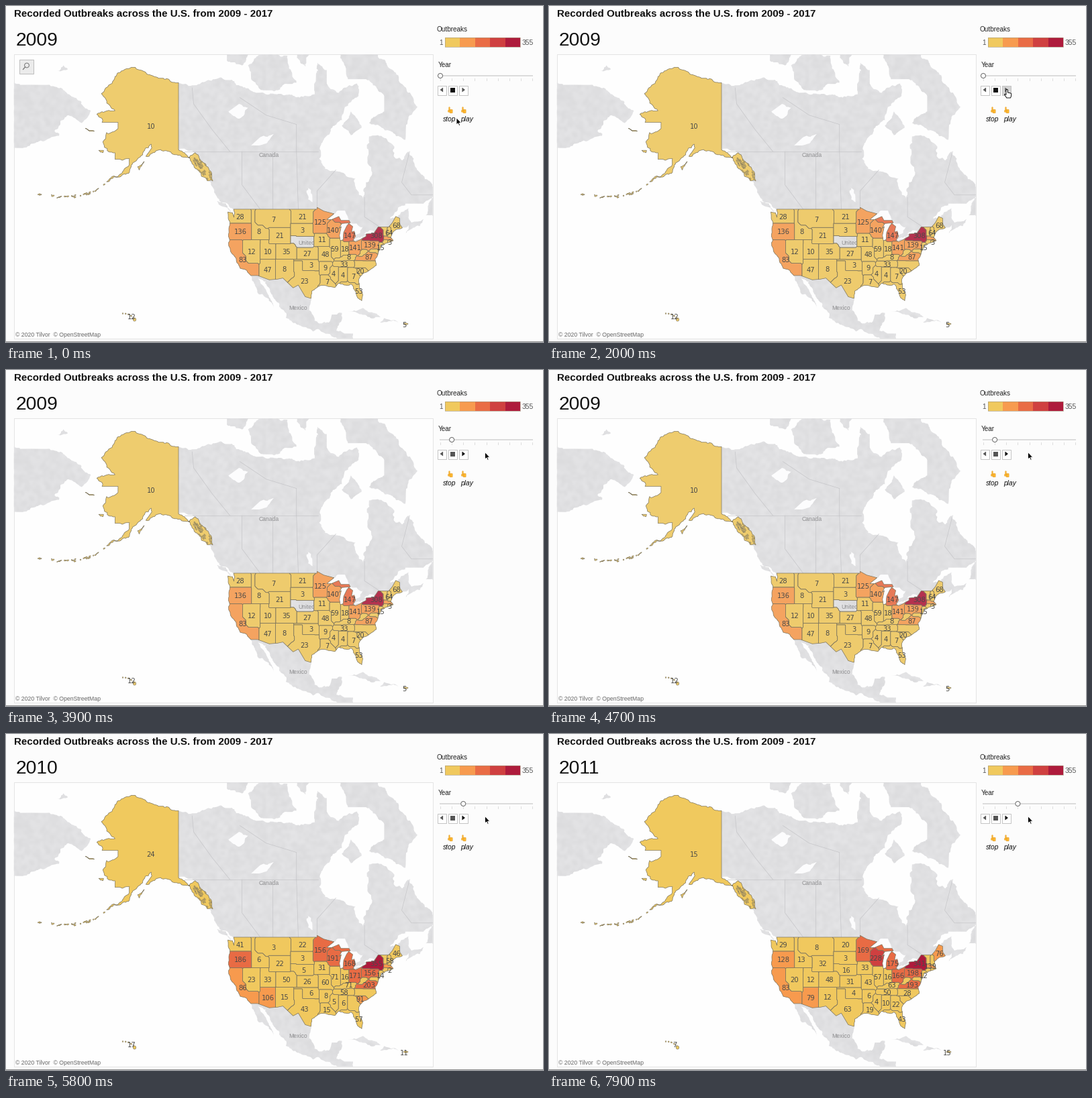
Animation of 800x501 px, one loop 8000 ms. Source, as a matplotlib script:

```python
import numpy as np
import matplotlib.pyplot as plt
from matplotlib.animation import FuncAnimation
from matplotlib.colors import to_rgba_array
from matplotlib.patches import Circle, Ellipse, FancyBboxPatch, PathPatch, Polygon, Rectangle
from matplotlib.path import Path

W, H, DPI = 800, 501, 100
STEP, FRAMES = 100, 80
PT = 72 / DPI
INK, LINE = "#4a4a48", "#7d755e"
SCALE = ["#f0c95e", "#f79b4f", "#e96c45", "#cf4040", "#ae1b3c"]
rng = np.random.default_rng(9)

fig = plt.figure(figsize=(W / DPI, H / DPI), dpi=DPI, facecolor="#fcfcfc")
ax = fig.add_axes([0, 0, 1, 1])
ax.axis("off")


def put(patch, z):
    patch.set_zorder(z)
    return ax.add_patch(patch)


def label(x, y, s, size, color=INK, z=8, **kw):
    kw = {"family": "Liberation Sans", "va": "baseline", **kw}
    return ax.text(x, y, s, fontsize=size * PT, color=color, zorder=z, **kw)


def project(flat):
    """Web Mercator; flat holds west longitude, latitude pairs."""
    p = np.reshape(flat, (-1, 2)).astype(float)
    m = np.log(np.tan(np.pi / 4 + np.radians(p[:, 1]) / 2))
    return np.column_stack([257 + (141 - p[:, 0]) * 4.506, 303 + (0.9838 - m) * 258])


def coast(*flat, amp=0.12):
    """Roughen a coarse line by midpoint displacement; straight borders stay."""
    def split(a, b):
        d = b - a
        size = np.hypot(*d)
        if size < 3 or abs(d).min() < 0.3:
            return [a]
        shift = np.clip(rng.normal(0, amp * size), -2, 2)
        mid = (a + b) / 2 + np.array([-d[1], d[0]]) / size * shift
        return split(a, mid) + split(mid, b)
    p = project(flat)
    return np.array(sum((split(a, b) for a, b in zip(p, p[1:])), []) + [p[-1]])


def outline(*polys):
    return Path.make_compound_path(*[Path(np.vstack([p, p[:1]]), closed=True) for p in polys])


# ---- coastlines ----
us_west = coast(117.1, 32.5, 118.4, 33.9, 120.6, 34.5, 121.9, 36.6, 122.5, 37.7, 123.8, 39,
                124.4, 40.4, 124.1, 42, 124.5, 42.8, 124, 46.2, 124.7, 48.4, 123.1, 48.2,
                122.7, 47.2, 122.4, 48.2, 122.8, 49, amp=0.06)
us_east = coast(67, 44.8, 70.5, 43.5, 70.8, 42.4, 70, 41.7, 74, 40.6, 75, 38.6, 76, 37,
                75.6, 35.3, 78, 33.9, 81.2, 31.8, 81.4, 30.6, 80.1, 27, 80.4, 25.2, 81.8, 26.1,
                82.8, 28.4, 84, 30.1, 85.3, 29.7, 88, 30.4, 89.3, 29.1, 91.5, 29.4, 94, 29.7,
                97, 28, 97.2, 25.9, amp=0.06)
us_north = project([95.2, 49, 95.2, 49.4, 93, 48.6, 89.6, 48, 92, 46.7, 90.4, 46.7, 88, 47.4, 87.3, 46.5,
                    84.6, 46.5, 84.2, 45.95, 87, 45.8, 88, 44.6, 87.2, 45.1, 87.8, 43, 87.5, 41.7,
                    86.6, 41.9, 86.4, 43.7, 85.4, 45.2, 84.7, 45.8, 83.4, 45.1, 83.8, 43.8, 82.9, 44,
                    82.5, 42.8, 83.3, 41.8, 82.5, 41.4, 81, 41.9, 78.9, 42.8, 79, 43.3, 76.4, 43.5,
                    75, 45, 71.5, 45, 70.3, 46, 69.2, 47.4, 67.9, 47, 67.8, 45.6])
us_south = project([99.1, 26.4, 101.4, 29.8, 103.1, 29, 106.5, 31.8, 108.2, 31.5, 111, 31.3, 114.8, 32.5])
lower48 = np.vstack([us_west, us_north, us_east, us_south])

arctic = coast(141, 60.3, 141, 69.6, 135, 69.3, 127, 70.2, 115, 68.4, 101, 67.8, 96, 68.2, 95, 71.8,
               92, 71, 92, 69.5, 88, 68.4, 82, 69.5, 81.5, 68, 86, 66.6, 87, 64.8, 94, 61, 94.5, 58.8,
               92.5, 57, 88, 56.5, 82.5, 55.2, 82, 53, 80, 51.3, 79, 54.5, 77, 56, 78.5, 58.5, 78, 62.4,
               73.5, 62.3, 70, 61, 69.5, 59, 67, 58.5, 65, 60, 61.5, 56.5, 57, 54, 55.7, 52.5, 60, 50.2,
               66, 50.2, 71, 46.9, 65, 49.2, 64, 46, 60, 46.8, 61.2, 45.2, 65.8, 43.5, 64.8, 45.5, 67, 44.8)
mexico = coast(97.2, 25.9, 97.8, 22.3, 96, 19.1, 94.5, 18.2, 91, 18.8, 90.3, 21, 87, 21.5, 88.8, 15.9,
               83.3, 15, 83.7, 11, 88, 12.8, 94.3, 16.2, 96.5, 15.7, 102, 18, 105.5, 20, 105.4, 21.5,
               109.4, 25.8, 113.1, 31.2, 114.8, 31.7, 109.5, 23.1, 112.2, 26.2, 114.8, 27.5, 117.1, 32.5)
north_pacific = coast(122.8, 49, 127.5, 51, 130.3, 54.5, 135.5, 59.8, 141, 60.3)

land = [np.vstack([arctic, us_east, mexico, us_west, north_pacific])]
land += [coast(*p) for p in [
    (125, 72, 120, 71.5, 117, 73, 118, 74, 124, 74, 125, 72),
    (117, 70, 113, 68.7, 102, 69.6, 105, 72.5, 114, 72.8, 118, 71.5, 117, 70),
    (102, 72.7, 99, 71.4, 97, 74, 101, 74, 102, 72.7),
    (90, 74, 85, 70, 79, 70, 73, 68, 73, 66, 78, 64.4, 66, 61.9, 65, 65, 62, 66.6, 72, 71.5, 80, 73.7, 90, 74),
    (87, 64, 84, 62.6, 80.5, 63.7, 84, 66, 87, 64),
    (59.3, 47.7, 57, 51.4, 55.5, 51.4, 53, 47, 59.3, 47.7),
    (128.3, 50.7, 125.3, 50.2, 123.5, 48.4, 128.3, 50.7),
    (84.9, 21.9, 80, 23, 74.2, 20.2, 77.5, 19.9, 84.9, 21.9),
    (74.4, 18.5, 73, 19.9, 68.4, 18.6, 74.4, 18.5),
    (200, 70, 180, 69, 170, 66.1, 173, 64.4, 177.5, 65.5, 182, 63.2, 180.5, 62.5, 200, 59.8),
    (181, 70.9, 179, 71.5, 177.6, 71.1, 181, 70.9)]]

frame = put(Rectangle((11.5, 71.5), 624, 424, fc="#fefefe", ec="#e4e4e4", lw=PT), 0)
shape = outline(*land)
put(PathPatch(shape, fc="#e5e5e7", ec="none"), 1).set_clip_path(frame)
relief = ax.imshow(rng.random((106, 156)), cmap="gray", alpha=0.05, extent=(11, 635, 495, 72),
                   interpolation="bicubic", aspect="auto", zorder=2)
relief.set_clip_path(shape, ax.transData)

for lake in [(92, 46.7, 88.4, 48.7, 86, 48.7, 84.6, 46.5, 87.3, 46.5),
             (88, 44.6, 87.5, 41.7, 86.3, 42, 85, 45.9, 87, 45.8),
             (84.5, 46, 80, 45, 81.7, 43.3, 82.4, 43, 84, 44),
             (83.2, 41.6, 79, 42.8, 80.5, 42.7, 82.5, 42.2),
             (79.6, 43.3, 76.3, 43.5, 76.5, 44.1, 79, 43.8),
             (124.5, 66, 121, 65, 118, 66.5, 121, 67),
             (117, 61, 112, 61.3, 109.5, 62.8, 114, 62.3),
             (98.5, 53.6, 98, 51.5, 96.7, 50.5, 97.2, 53)]:
    put(Polygon(coast(*lake), fc="#fcfcfd", ec="none"), 3)

for border in [(139, 60, 94.8, 60), (136.5, 69, 136, 67, 130, 63.5, 124, 60),
               (120, 60, 120, 54, 114, 49), (110, 60, 110, 49), (102, 60, 101.4, 49),
               (102, 60, 102, 64.2, 112, 65.5, 120.7, 67.8), (89, 56.8, 95.2, 52.8, 95.2, 49),
               (79.5, 51.5, 79.5, 47.3, 74.5, 45), (64.6, 60, 67.2, 54.5, 64, 52, 57, 52)]:
    ax.plot(*project(border).T, color="#c6c6c9", lw=0.7 * PT, zorder=3)

for x, y, s in [(392, 225, "Canada"), (448, 356, "United"), (435, 453, "Mexico")]:
    label(x, y, s, 8.7, "#8e8e90", 4, ha="center")

# ---- states: every point belongs to the nearest box, cut by the coast ----
GX, GY = np.meshgrid(np.arange(326, 596, 0.5), np.arange(299, 447, 0.5))
dist, counts, tags = [], [], []


def count_label(x, y):
    tags.append(label(x, y, "", 10, family="DejaVu Sans", ha="center", va="center_baseline"))


def box_distance(x, y, w, h):
    qx, qy = abs(GX - x) - w, abs(GY - y) - h
    return np.hypot(np.maximum(qx, 0), np.maximum(qy, 0)) + np.minimum(np.maximum(qx, qy), 0)


def state(x, y, w, h, *yearly, more=()):
    """Box centre (also the label) and half sizes; yearly counts: 0 none, < 0 unlabelled."""
    dist.append(np.min([box_distance(*b) for b in [(x, y, w, h), *more]], axis=0))
    counts.append(yearly)
    count_label(x, y)


state(349, 314, 16, 9.5, 28, 41, 29)
state(349, 336.5, 16, 12.2, 136, 186, 128)
state(376, 336, 9.5, 12.3, 8, 6, 13, more=[(367.5, 314, 2, 10), (386, 341, 6, 7.5)])
state(398, 318, 25.8, 12, 7, 3, 8)
state(408, 342.5, 15.8, 12, 21, 22, 32)
state(442, 314, 17, 10, 21, 22, 20)
state(441, 333.5, 17, 9.2, 3, 3, 3)
state(443, 352, 14, 8, 0, 5, 16, more=[(428, 348, 4, 5.5)])
state(449, 369, 16.3, 8.8, 27, 26, 31)
state(418, 366, 15.5, 11.8, 35, 50, 48)
state(390, 366, 11.2, 11.7, 10, 33, 12, more=[(385, 354, 6, 5.3)])
state(366, 366, 12.6, 17.3, 12, 23, 20)
state(353, 378, 8, 9, 83, 86, 83, more=[(341, 361, 10.5, 12.3), (364, 393, 11, 9)])
state(390, 393, 11.2, 15.3, 47, 106, 79)
state(415, 392.5, 13.5, 15, 8, 15, 12)
state(445, 410, 14, 15, 23, 43, 63, more=[(435, 388, 6, 8), (432, 410, 8, 6), (460, 404, 6, 8)])
state(454, 386, 11.5, 7.8, 3, 6, 4, more=[(436, 378.8, 7, 1)])
state(476, 390.5, 8.5, 9.2, 9, 8, 6)
state(478, 411, 8, 9, 7, 15, 19)
state(476, 370, 11, 10.5, 48, 60, 43)
state(471, 348.5, 10.5, 9, 11, 31, 33)
state(468, 322, 11.5, 16.5, 125, 156, 169)
state(487, 334, 9.5, 10.8, 140, 191, 228)
state(490, 362, 7.5, 14.5, 59, 71, 57)
state(505, 362, 6, 11, 18, 16, 16)
state(520, 360, 9.3, 10.5, 141, 171, 166)
state(512, 342, 9, 10, 147, 168, 175, more=[(501, 320, 10, 2)])
state(511, 374, 10, 4, 8, 71, 63, more=[(496, 377, 6, 2)])
state(504, 385, 15.5, 3.7, 33, 58, 50)
state(488, 399, 7, 10.5, 4, 5, 4)
state(502, 401, 6.6, 11.5, 4, 6, 10)
state(517, 403, 8, 12, 7, -1, 22)
state(526, 425, 5, 10, 53, 57, 43, more=[(510, 413, 12, 3)])
state(528, 395, 7, 4.5, 20, 91, -1)
state(534, 385.5, 15, 4.5, -1, -1, 28)
state(541, 374, 9, 4.8, 87, 203, 193, more=[(528, 376.5, 8, 2)])
state(531, 368, 5, 4, -1, -1, -1)
state(549, 364.5, 5, 2, -1, -1, -1)
state(542, 356, 12.3, 5.8, 139, 156, 198)
state(558, 360.5, 2.3, 6, 15, 14, 12)
state(552, 342, 10, 8, 308, 355, 341, more=[(540, 345.5, 8, 4)])
state(564.5, 335, 2.6, 7, -1, -1, -1)
state(571, 338.5, 2.3, 7, 64, 58, -1)
state(582, 327, 8, 11, 68, 46, 76)
state(568, 346, 5, 2, -80, -100, 139)
state(565, 350.5, 3, 1.8, -1, -1, -1)
state(571, 352, 1.5, 2, 3, 2, -1)

dist = np.array(dist)
owner = dist.argmin(0)
first, second = np.partition(dist, 1, axis=0)[:2]
cut = outline(lower48)
fill = ax.imshow(np.zeros((*GX.shape, 4)), extent=(325.75, 595.75, 446.75, 298.75),
                 aspect="auto", zorder=5)
fill.set_clip_path(cut, ax.transData)
for k, d in enumerate(dist):
    rest = np.where(owner == k, second, first)
    edge = ax.contour(GX, GY, d - rest, levels=[0], colors=LINE, linewidths=0.65 * PT, zorder=6)
    edge.set_clip_path(cut, ax.transData)
put(PathPatch(cut, fc="none", ec=LINE, lw=0.7 * PT), 6)

# ---- detached areas ----
alaska = [coast(141, 69.6, 141, 60.3, 137.5, 58.9, 135.5, 59.8, 134, 58.5, 130, 56, 130, 55, 131.5, 54.8,
                134.7, 56.8, 138, 59, 144, 60, 148, 60.2, 151.8, 59.2, 150, 61.2, 154, 59, 158.5, 56,
                164.8, 54.6, 160, 56.1, 157.4, 57.6, 157.2, 58.8, 162, 58.7, 162, 59.8, 164.2, 60,
                166, 61.6, 164.8, 63, 161, 63.6, 161, 64.5, 166.3, 64.5, 168, 65.6, 162, 66.1,
                163.7, 66.8, 166.5, 68.3, 163, 69.5, 162, 70.3, 156.6, 71.3, 152, 70.8, 146, 70.1, 141, 69.6)]
alaska += [coast(154.5, 57.4, 152.3, 58.3, 154, 56.8, 154.5, 57.4),
           coast(171.8, 63.6, 168.8, 63.2, 170.5, 63.2, 171.8, 63.6),
           coast(167.4, 60.2, 165.8, 60.2, 166, 59.8, 167.4, 60.2)]
put(PathPatch(outline(*alaska), fc="none", ec=LINE, lw=0.7 * PT), 5)
spots = []


def islet(x, y, w, h, angle):
    spots.append(put(Ellipse((x, y), w, h, angle=angle, ec=LINE, lw=0.6 * PT), 5))


for f in np.sort(rng.random(26)):
    x = 47 + 100 * f
    islet(x, 284.5 - 20 * (f - 0.4) ** 2 * (1 + 1.6 * f) + rng.normal(0, 0.8),
          rng.uniform(1, 4.5), rng.uniform(0.8, 1.8), -15 - 20 * f)
for f in rng.random(22):
    islet(280 + 25 * f + rng.normal(0, 2.5), 226 + 31 * f + rng.normal(0, 3), rng.uniform(3, 8), 1.5, 55)
for k in range(5):
    islet(174 + 4.2 * k, 458.5 + 0.45 * k * k / 2 * (1 + k / 4), 1.6 + k * 0.3, 1.6, 30)
islet(191.5, 467.5, 4.5, 5, 0)
islet(595.5, 474, 7, 2.2, 0)
mainland = put(PathPatch(outline(alaska[0]), ec="none"), 4.9)
isles = put(PathPatch(outline(*alaska[1:]), ec="none"), 4.9)
for place, yearly in [((216, 179), (10, 24, 15)), ((187, 463), (12, 17, 7)), ((593, 475), (5, 11, 15))]:
    count_label(*place)
    counts.append(yearly)
counts = np.array(counts)

# ---- headings, legend and controls ----
label(12, 16, "Recorded Outbreaks across the U.S. from 2009 - 2017", 15.1, "#111111", weight="bold")
year = label(15, 59, "", 28.3, "#111111")
label(14, 493, "© 2020 Tilvor  © OpenStreetMap", 8.8, "#666666")
put(Rectangle((0, 499.5), W, 2, fc="#8f8f8f", ec="none"), 8)

search = [put(Rectangle((19.5, 79.5), 21, 21, fc="#ebebeb", ec="#bdbdbd", lw=PT), 8),
          put(Circle((31, 88.5), 3.4, fc="none", ec="#777777", lw=PT), 9),
          *ax.plot([28.5, 25.5], [91, 94.5], color="#777777", lw=1.3 * PT, zorder=9)]

label(642, 38, "Outbreaks", 10, "#222222")
label(644, 91, "Year", 10, "#222222")
label(645, 58, "1", 10, "#555555")
label(769, 58, "355", 10.2, "#555555")
for k, c in enumerate(SCALE):
    put(Rectangle((653.5 + k * 22.5, 47), 22.5, 14, fc=c, ec="none"), 8)
put(Rectangle((653.5, 47), 112.5, 14, fc="none", ec="#a59a80", lw=0.6 * PT), 9)

NOTCH = 137 / 8
ax.plot([647, 784], [104, 104], color="#dcdcdc", lw=2 * PT, zorder=8)
for k in range(9):
    ax.plot([647 + k * NOTCH] * 2, [108, 110.5], color="#dedede", lw=PT, zorder=8)
knob = put(Circle((647, 104), 3.5, fc="white", ec="#777777", lw=1.1 * PT), 9)

boxes = [put(Rectangle((x, 118.5), 13, 14, fc="white", ec="#c4c4c4", lw=PT), 8)
         for x in (642.5, 658.5, 674.5)]
TRIANGLE = np.array([(0, 0), (4.6, -3.5), (4.6, 3.5)])
put(Polygon(TRIANGLE + (646.5, 125), fc="#555555", ec="none"), 9)
stop = put(Rectangle((662, 121.7), 6.5, 6.8, ec="none"), 9)
play = put(Polygon(TRIANGLE * (-1, 1) + (684, 125), ec="none"), 9)

for x, word in [(651, "stop"), (677, "play")]:
    label(x, 172, word, 10.3, "#111111", style="italic")
for x in (662, 682):
    for dx, y, w, h in [(-2.4, 150.6, 1.8, 6), (-1, 154.2, 4.2, 5.6), (-3.6, 155.3, 3, 3)]:
        put(FancyBboxPatch((x + dx, y), w, h, boxstyle="round,pad=0,rounding_size=0.9",
                           fc="#fbb62f", ec="#d98a1c", lw=0.3 * PT), 9)

ARROW = np.array([(0, 0), (0, 10.6), (2.4, 8.4), (4, 12), (5.7, 11.3), (4.1, 7.8), (7.3, 7.6)])
HAND = np.array([(-1, 0), (0.3, -0.6), (1.4, 0.2), (1.5, 4), (5.8, 5), (6.8, 6), (6.5, 9.5),
                 (5.5, 12), (-0.3, 12), (-1.6, 9.8), (-3.6, 7.2), (-3, 6.2), (-1, 7.4)])
cursor = put(Polygon(ARROW, closed=True, lw=0.9 * PT), 20)

ax.set_xlim(0, W)
ax.set_ylim(H, 0)


def glide(t, t0, t1, a, b):
    k = np.clip((t - t0) / (t1 - t0), 0, 1)
    k = k * k * (3 - 2 * k)
    return np.array(a) + (np.array(b) - np.array(a)) * k


def show_year(n):
    year.set_text(str(2009 + n))
    now = counts[:, n]
    colors = to_rgba_array(SCALE)
    if n == 0:  # the first year is slightly paler
        colors[:, :3] = 0.88 * colors[:, :3] + 0.12 * 0.88
    rgba = colors[np.clip((abs(now) - 1) / 70.8, 0, 4).astype(int)]
    rgba[now == 0, 3] = 0
    fill.set_data(rgba[owner])
    for patch in [mainland, isles, *spots]:
        patch.set_facecolor(colors[0])
    for tag, v in zip(tags, now):
        tag.set_text(str(v) if v > 0 else "")


def update(i):
    t = i * STEP
    show_year((t >= 4800) + (t >= 7000))
    for part in search:
        part.set_visible(t < 2000)

    page = (t >= 2800) + (t >= 5000) + (t >= 7200)
    knob.center = (647 + page * NOTCH, 104)
    playing = t >= 2500
    stop.set_facecolor("#555555" if playing else "#111111")
    play.set_facecolor("#111111" if playing else "#555555")

    hover = 900 <= t < 2700
    boxes[2].set_facecolor("#d4d4d4" if hover else "white")
    if t < 900:
        tip = glide(t, 100, 600, (671, 166.5), (683, 130))
    else:
        tip = glide(t, 2600, 3100, (682, 125), (713.5, 122.5))
    cursor.set_xy((HAND if hover else ARROW) + tip)
    cursor.set_facecolor("white" if hover else "black")
    cursor.set_edgecolor("black" if hover else "white")
    return []


anim = FuncAnimation(fig, update, frames=FRAMES, interval=STEP, repeat=True, repeat_delay=0)
plt.show()
```
